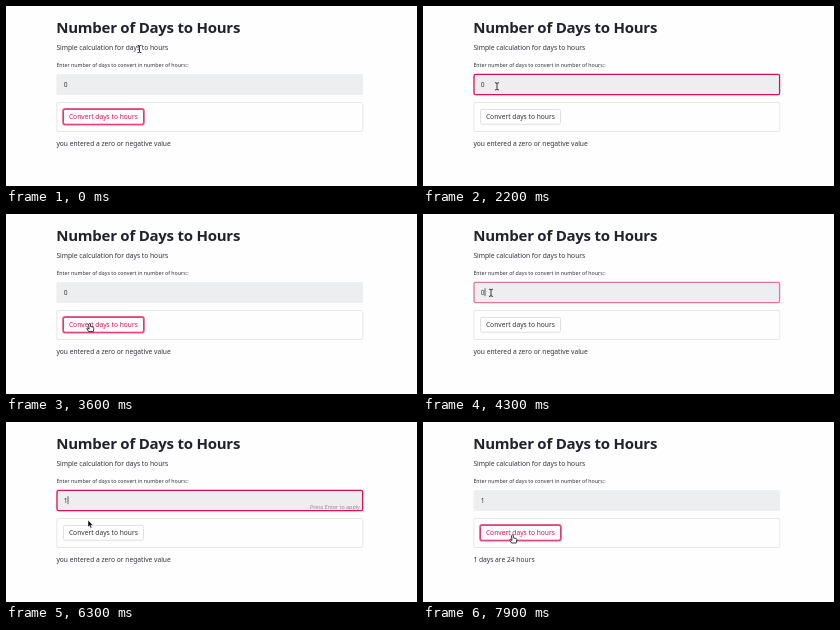
These frames come from a looping animation (411 by 180 pixels, 8000 ms). An HTML page:

```html
<!DOCTYPE html>
<html lang="en">
<head>
<meta charset="utf-8">
<title>Number of Days to Hours</title>
<style>
  html, body { margin: 0; width: 100%; height: 100%; overflow: hidden; background: #fefefe; }
  svg { display: block; font: 6.68px "Noto Sans", "Open Sans", sans-serif; fill: #30323c; }
  h1, .title { font-size: 15px; font-weight: 700; letter-spacing: -.24px; fill: #20222c; }
  .label { font-size: 5.28px; }
  .hint { font-size: 5.34px; fill: #8b8c93; }
  .box { fill: none; stroke: #dfe0e4; }
</style>
</head>
<body>
<svg width="411" height="180" viewBox="0 0 411 180">
  <text class="title" x="50.2" y="26.6">Number of Days to Hours</text>
  <text x="50.4" y="44.4">Simple calculation for days to hours</text>
  <text class="label" x="50.4" y="61.2">Enter number of days to convert in number of hours::</text>

  <rect x="50.5" y="68" width="306.5" height="21" rx="1.8" fill="#edeef0"/>
  <rect id="focus" x="51" y="68.3" width="305.6" height="20.4" rx="1.6" fill="none" stroke="#dc0f56" stroke-width="1.3"/>
  <text id="value" x="57.8" y="80.7"></text>
  <path id="caret" stroke="#20222c" stroke-width=".7"/>
  <text id="hint" class="hint" x="304" y="86.6">Press Enter to apply</text>

  <rect class="box" x="50.8" y="96.5" width="306" height="29" rx="1.8" stroke-width=".8"/>
  <rect id="ring" x="56.9" y="102.8" width="81.2" height="16" rx="2.2" fill="none" stroke="#e8628f" stroke-width="1.5"/>
  <rect id="button" x="57.5" y="103.4" width="80" height="14.8" rx="1.8" stroke-width=".8"/>
  <text id="caption" x="62.9" y="113.2">Convert days to hours</text>

  <text id="result" x="50.4" y="140.4"></text>

  <g id="pointer" stroke-linejoin="round" stroke-linecap="round">
    <path id="beam" d="M-1.6-3.6Q0-3.6 0-2.8Q0-3.6 1.6-3.6M0-2.8V2.8M-1.6 3.6Q0 3.6 0 2.8Q0 3.6 1.6 3.6" fill="none" stroke="#222" stroke-width=".9"/>
    <path id="arrow" d="M0 0V6.8L1.6 5.4L2.6 7.9L3.8 7.4L2.8 5H4.9Z" fill="#111" stroke="#fff" stroke-width=".4"/>
    <path id="hand" d="M-.8.5Q0-.5.8.5V3L3.8 3.8Q4.5 4.1 4.3 5L3.7 8.2H-.9L-2.7 5.4Q-2.8 4.3-1.8 4.6L-.8 5.5Z" fill="#fff" stroke="#222" stroke-width=".9"/>
  </g>
</svg>
<script>
const LOOP = 8000, STEP = 100, PINK = "#dc0f56";
const el = id => document.getElementById(id);
const show = (id, on) => el(id).style.display = on ? "" : "none";
const within = (v, a, b) => v >= a && v < b;

// Pointer hot spot: [ms, x, y]
const route = [
  [0, 133.5, 43], [700, 133.5, 43], [1400, 74, 80.3], [2700, 74, 80.3],
  [3000, 87.5, 117], [3500, 87.5, 117], [4000, 68, 78.8], [6200, 68, 78.8],
  [6300, 82, 98.3], [6500, 89.5, 112.8], [LOOP, 89.5, 112.8]
];
// Input focus: [gained, lost]
const focused = [[1600, 3400], [4300, 7400]];
const pressed = [3400, 7400];
// Caret blinking restarts at each of these
const blinkStarts = [1600, 4300, 4900, 5800];

function position(t) {
  const i = route.findIndex(p => p[0] > t);
  const [t0, x0, y0] = route[i - 1], [t1, x1, y1] = route[i];
  const k = (t - t0) / (t1 - t0);
  return [x0 + (x1 - x0) * k, y0 + (y1 - y0) * k];
}

function ramp(t, start) {
  return t < start ? 0 : Math.min(1, .55 + (t - start) / STEP * .3);
}

function pointerKind(x, y) {
  if (within(y, 103, 119)) return "hand";
  const overText = within(y, 38, 47) || within(y, 56, 63) || within(y, 68, 89);
  return overText ? "beam" : "arrow";
}

function draw(t) {
  const [x, y] = position(t), kind = pointerKind(x, y);
  el("pointer").setAttribute("transform", `translate(${x} ${y})`);
  for (const k of ["beam", "arrow", "hand"]) show(k, k === kind);

  const typing = focused.some(([a, b]) => within(t, a, b));
  const glow = focused.reduce((sum, [a, b]) => sum + ramp(t, a) * (1 - ramp(t, b)), 0);
  el("focus").style.opacity = glow;

  const value = t < 4900 ? "0" : t < 5800 ? "" : "1";
  el("value").textContent = value;
  const blink = blinkStarts.filter(s => s <= t).pop();
  show("caret", typing && (t - blink) % 1200 < 600);
  el("caret").setAttribute("d", `M${value ? 62 : 58.2} 74.3V82.2`);
  show("hint", within(t, 5000, 7400));

  const down = pressed.some(p => within(t, p, p + STEP));
  const ring = t < 1600 || within(t, 3400, 4300) || t >= 7400;
  const lit = ring || kind === "hand";
  show("ring", ring);
  el("button").style.fill = down ? PINK : "#fff";
  el("button").style.stroke = lit ? PINK : "#d8d9de";
  el("caption").style.fill = down ? "#fbe3eb" : lit ? PINK : "";

  el("result").textContent = t < 7700 ? "you entered a zero or negative value" : "1 days are 24 hours";
}

function tick() {
  draw(Math.floor(performance.now() % LOOP / STEP) * STEP);
  requestAnimationFrame(tick);
}
tick();
</script>
</body>
</html>
```
